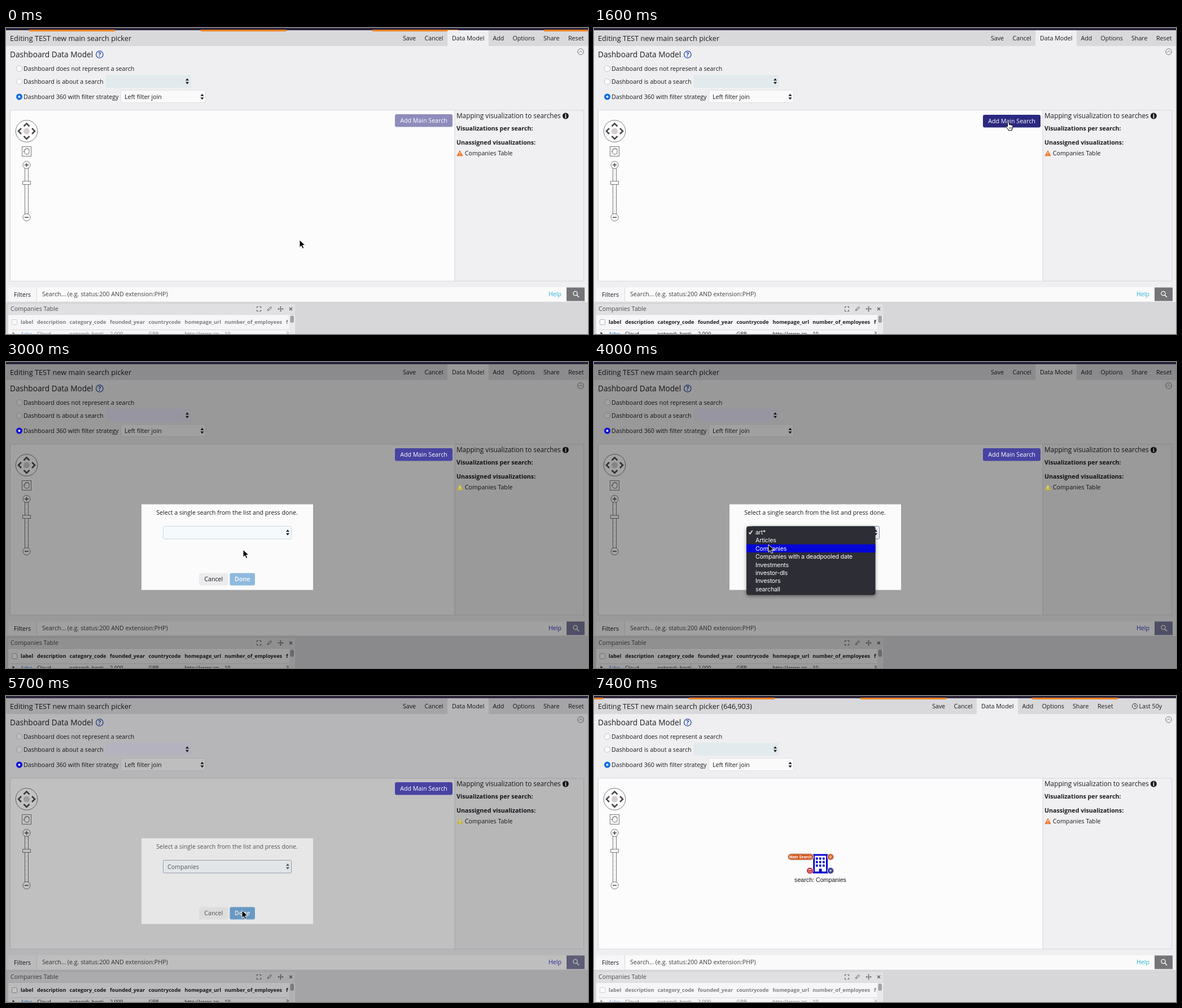
An HTML page that plays this animation: 1031x543 px, repeating every 7.5 s.

```html
<!DOCTYPE html>
<html lang="en">
<head>
<meta charset="utf-8">
<title>Main search picker</title>
<style>
  html, body { margin: 0; width: 100%; height: 100%; overflow: hidden; background: #efeff1; }
  svg { display: block; width: 1031px; height: 543px; }
  text { font: 10.67px "Open Sans", sans-serif; fill: #1c1c20; white-space: pre; }
  .b { font-weight: 700; }
  .title { font-size: 12.76px; }
  .h1 { font-size: 13.64px; }
  .h2 { font-size: 11.77px; }
  .cell { font-size: 9.15px; }
  .arial { font-family: "Liberation Sans", Arial, sans-serif; }
  .badge { font: 700 6.8px "Liberation Sans", Arial, sans-serif; fill: #fff; }
  .opt { font-family: Inter, sans-serif; letter-spacing: -.19px; fill: #fff; }
  .w { fill: #fff; }
  .semi { font-weight: 600; }
  .mid { text-anchor: middle; }
  #listBox { filter: drop-shadow(0 2px 3px rgba(0, 0, 0, .4)); }
</style>
</head>
<body>
<svg id="stage" viewBox="0 0 1031 543" xmlns="http://www.w3.org/2000/svg"></svg>
<script>
const LOOP = 7500, STEP = 100;
const stage = document.getElementById('stage');

const rect = (x, y, w, h, fill, more = '') =>
  `<rect x="${x}" y="${y}" width="${w}" height="${h}" fill="${fill}" ${more}/>`;
const circle = (x, y, r, fill, more = '') =>
  `<circle cx="${x}" cy="${y}" r="${r}" fill="${fill}" ${more}/>`;
const path = (d, fill, more = '') => `<path d="${d}" fill="${fill}" ${more}/>`;
const line = (d, color, width = 1) =>
  path(d, 'none', `stroke="${color}" stroke-width="${width}"`);
const text = (x, y, str, cls = '', more = '') =>
  `<text x="${x}" y="${y}" class="${cls}" ${more}>${str}</text>`;
const group = (id, body) => `<g id="${id}">${body}</g>`;
const arrows = (x, y) =>
  path(`M${x - 3} ${y - 1.2}l3 -4 3 4zM${x - 3} ${y + 1.2}l3 4 3 -4z`, '#1c1c20');
const radio = y => circle(23.5, y, 5.2, '#fafafa', 'stroke="#c4c4c8"');

function header() {
  const items = [['Save', 703], ['Cancel', 741.5], ['Data Model', 790], ['Add', 862.5],
    ['Options', 897.5], ['Share', 952], ['Reset', 996]];
  return rect(0, 0, 1031, 32, '#d9d9dc') + rect(0, 0, 1031, 4, '#2a2338')
    + group('bar', '') + text(7, 23, '', 'title', 'id="title"')
    + group('menu', rect(782, 4, 73, 28, '#efeff1') + items.map(([s, x]) => text(x, 22, s)).join(''))
    + group('range', circle(958, 18, 4.6, 'none', 'stroke="#333"')
      + line('M958 15v3.3h2.5', '#333') + text(965.5, 22, 'Last 50y'));
}

function form() {
  return text(7, 52, 'Dashboard Data Model', 'h1')
    + circle(165.8, 47, 6.2, 'none', 'stroke="#2545a8" stroke-width="1.3"')
    + text(165.8, 51, '?', 'b mid', 'style="fill:#2545a8"')
    + circle(1018, 42, 5.3, 'none', 'stroke="#77777c"') + line('M1015 43.5l3 -3 3 3', '#77777c')
    + radio(72) + text(31, 75.5, 'Dashboard does not represent a search')
    + radio(95) + text(31, 98.5, 'Dashboard is about a search')
    + rect(176.5, 83, 151, 23, '#e2eaed', 'rx="2" id="field"') + arrows(321, 94.5)
    + text(31, 125.5, 'Dashboard 360 with filter strategy')
    + rect(203.5, 110.5, 150, 22, '#fafafa', 'rx="2" stroke="#dfe2e8"')
    + text(210, 125.5, 'Left filter join') + arrows(347.5, 122);
}

function controls() {
  const dots = Array.from({ length: 10 }, (_, i) => rect(36, 252.5 + i * 8, 1, 1, '#999')).join('');
  const edge = 'stroke="#77777c"';
  return circle(36.5, 183, 19.3, '#fff', edge) + circle(36.5, 183, 5.5, '#d6cdd1')
    + line('M31.5 174.5l5 -5 5 5M31.5 192l5 5 5 -5M27 178l-5 5 5 5M46 178l5 5 -5 5', '#48484e', 2.6)
    + rect(28.5, 210.5, 16, 17, '#fdfdfd', edge)
    + path('M33 219.5v-3.5a1 1 0 0 1 2 0v-1.5a1 1 0 0 1 2 0a1 1 0 0 1 2 0v1a1 1 0 0 1 2 0v5q0 3.5 -3 3.5h-2q-1.5 0 -2.5 -1.500l-2.500 -3.500q.5 -1.5 2 .5z',
      '#fff', 'stroke="#55555a" stroke-width=".9"')
    + rect(33.5, 249, 6, 81, '#fff', edge) + dots
    + circle(36.5, 243, 6.5, '#fff', edge) + circle(36.5, 336, 6.5, '#fff', edge)
    + line('M33 243h7M36.5 239.5v7M33 336h7', '#48484e', 1.5)
    + rect(29.5, 272, 14, 5.5, '#fff', edge);
}

function node() {
  let windows = '';
  for (let i = 0; i < 9; i++)
    windows += rect(393 + i % 3 * 6, 286.5 + Math.floor(i / 3) * 6.2, 3.6, 4, '#0808cf');
  const rim = 'stroke="#cfcfd4" stroke-width="1.2"';
  return rect(389.7, 282, 22.8, 31, '#fff', 'stroke="#0808cf" stroke-width="3"') + windows
    + rect(398.6, 306.5, 5, 7, '#0808cf') + rect(387, 312, 28, 2.5, '#0808cf')
    + rect(343.5, 279.8, 45.5, 11.2, '#d2591f', `rx="5.6" ${rim}`)
    + text(366, 287.8, 'Main Search', 'badge mid')
    + circle(419, 285.5, 5.6, '#d2591f', rim) + text(419, 287.8, '0', 'badge mid')
    + circle(382.5, 310, 5.6, '#d0141c', rim)
    + line('M380.3 308.5h4.4l-.4 4h-3.6zM379.8 307.5h5.4', '#fff', .8)
    + circle(419, 310, 5.6, '#3a3a98', rim) + line('M416.8 310h4.4M419 307.8v4.4', '#fff')
    + text(401, 329.5, 'search: Companies', 'arial mid');
}

function panels() {
  return rect(7.5, 146, 1016, 303, '#f0f0f2', 'stroke="#d6d6df"')
    + rect(8, 146.5, 787, 302, '#fcfcfc') + line('M795 146v303', '#d6d6df')
    + controls() + group('node', node())
    + text(798, 160, 'Mapping visualization to searches', 'h2')
    + circle(991.3, 156, 5.5, '#1c1c20') + text(991.3, 159.6, 'i', 'b w mid')
    + text(798, 181.5, 'Visualizations per search:', 'b')
    + text(798, 206.5, 'Unassigned visualizations:', 'b')
    + text(812.8, 225.8, 'Companies Table');
}

function filters() {
  return rect(0, 486, 1031, 57, '#d7d7da')
    + rect(4, 460, 50, 25, '#f6f6f8') + rect(55, 460, 938, 25, '#fafafa')
    + text(14, 476.5, 'Filters') + line('M54.5 460v25', '#dcdce0')
    + text(64, 476, 'Search... (e.g. status:200 AND extension:PHP)', '', 'style="fill:#404046"')
    + text(961, 476, 'Help', '', 'id="help"')
    + rect(993, 460.5, 32, 24, '#757579', 'id="go"')
    + circle(1008.5, 471, 3.6, 'none', 'stroke="#fff" stroke-width="1.3"')
    + line('M1011 473.7l4 4', '#fff', 1.6);
}

function table() {
  const heads = [['label', 26], ['description', 55], ['category_code', 112.5], ['founded_year', 184],
    ['countrycode', 252.5], ['homepage_url', 316.5], ['number_of_employees', 387.3], ['f', 496]];
  const cells = ['Cloud', 'network_hosti', '2,009', 'GBR', 'http://www.ap', '10', '3'];
  return rect(4, 490, 508, 53, '#f6f6f8') + rect(4, 490, 508, 18, '#e0e0e3')
    + text(8, 502, 'Companies Table', '', 'style="fill:#4c4c52"')
    + line('M444.5 497v-2.5h2.5M449 494.5h2.5v2.5M451.5 500v2.5h-2.5M447 502.5h-2.5v-2.5', '#55555a')
    + line('M463.5 501.5l.7 -2.5 4.5 -4.5 1.8 1.8 -4.5 4.5z', '#55555a')
    + line('M486.5 494v9M482 498.5h9M485 495.5l1.5 -1.5 1.5 1.5M485 501.5l1.5 1.5 1.5 -1.5M483.5 497l-1.5 1.5 1.5 1.5M489.5 497l1.5 1.5 -1.5 1.5', '#55555a', .9)
    + line('M502 496l5 5M507 496l-5 5', '#55555a', 1.2)
    + line('M4 508.5h508M8 535.5h493', '#d9d9dd')
    + '<clipPath id="cut"><rect x="4" y="509" width="497" height="34"/></clipPath>'
    + '<g clip-path="url(#cut)">' + group('rows', rect(10.5, 517.5, 9, 9, '#fff', 'rx="1" stroke="#aaa"')
      + heads.map(([s, x]) => text(x, 525.3, s, 'cell b')).join('')
      + path('M11.5 539l4 3 -4 3z', '#444')
      + text(26, 545.5, 'Arbo', 'cell', 'style="fill:#2a78c8"')
      + cells.map((s, i) => text(heads[i + 1][1], 545.5, s, 'cell')).join('')) + '</g>'
    + rect(501.5, 509, 10, 34, '#e9e9ec') + rect(503.5, 510.5, 6.5, 12.5, '#a2a2a6', 'rx="2.5"');
}

const OPTIONS = ['art*', 'Articles', 'Companies', 'Companies with a deadpooled date',
  'Investments', 'investor-dls', 'Investors', 'searchall'];
const ROW = 14.45, TOP = 295;

function dialog() {
  return rect(240, 252.5, 304, 152, '#fbfbfb')
    + text(391.5, 271, 'Select a single search from the list and press done.', 'mid')
    + rect(278.5, 291.5, 227, 22.5, '#f5fafc', 'rx="2" id="pick"')
    + text(286, 306.5, 'Companies', '', 'id="chosen"') + arrows(499, 302.5)
    + rect(342, 374.5, 51.5, 22, '#ececee', 'rx="3"') + text(367.8, 389.3, 'Cancel', 'mid')
    + rect(396.5, 374.5, 44.5, 22, '', 'rx="3" id="doneBox"')
    + text(418.7, 389.3, 'Done', 'w semi mid', 'id="doneText"');
}

function dropdown() {
  return rect(270, 291.5, 228.5, 122, '#2d2d35', 'rx="4" id="listBox"')
    + rect(270, 0, 228.5, ROW, '#0404d6', 'id="hover"')
    + line('M274.5 302.5l2 2.5 4 -6', '#fff', 1.5)
    + OPTIONS.map((s, i) => text(286, 305.7 + i * ROW, s, 'opt')).join('');
}

const arrowShape = path('M0 0v13.5l3.2 -3 2.2 5 2.4 -1 -2.2 -5h4.4z', '#000', 'stroke="#fff"');
const handShape = path('M-1.5 1.2q1.5 -1.5 2.7 0l.3 4.6q1.5 -1 2.2 .2q1.5 -.8 2.2 .4q1.9 -.6 2.1 1.2l-.4 3.9 -1.2 2.5v1.8h-6.2l-.3 -1.7 -4 -4.7q-.3 -1.8 1.5 -1.4l1.3 1.3z', '#fff', 'stroke="#000"')
  + line('M2 10v3M4 10v3M6 10v3', '#000', .7);

stage.innerHTML = rect(0, 0, 1031, 543, '#efeff1') + header() + form() + panels() + filters() + table()
  + rect(0, 4, 1031, 539, '#000', 'id="shade"')
  + circle(23.5, 122, 5.5, '', 'id="dot"') + circle(23.5, 122, 2, '#fff')
  + group('add', rect(689, 153, 102, 22.5, '', 'rx="3" id="addBox"') + text(740, 168, 'Add Main Search', 'w mid'))
  + path('M804 216.8l5.7 10.5h-11.4z', '', 'id="warn"')
  + line('M804 220v4M804 225v1.3', '#f4f4ea', 1.2)
  + group('modal', dialog()) + group('list', dropdown())
  + group('arrow', arrowShape) + group('hand', handShape);

const el = {};
stage.querySelectorAll('[id]').forEach(n => el[n.id] = n);
const set = (id, name, value) => el[id].setAttribute(name, value);
const show = (id, on) => set(id, 'visibility', on ? 'visible' : 'hidden');
const ramp = (t, a, b) => Math.min(1, Math.max(0, (t - a) / (b - a)));

// time, x, y of the pointer tip; equal neighbours are rests
const TRACK = [[0, 520, 376], [700, 520, 376], [900, 587, 292], [1000, 583, 196], [1100, 600, 205],
  [1200, 662, 186], [1400, 734, 166], [1900, 734, 166], [2300, 470, 272], [2600, 420, 333],
  [3000, 420, 333], [3300, 400, 302], [3500, 400, 302], [3800, 309, 324], [4000, 309, 324],
  [4500, 307, 328], [4900, 307, 328], [5400, 418, 380], [5600, 418, 380], [5900, 418, 382],
  [6500, 418, 382], [7000, 430, 560], [LOOP, 430, 560]];

// Smooth curve through the track, standing still at rests
function slope(i, c) {
  const a = TRACK[i - 1], b = TRACK[i], n = TRACK[i + 1];
  if (!a || !n || a[c] === b[c] || b[c] === n[c]) return 0;
  return (n[c] - a[c]) / (n[0] - a[0]);
}

function pointer(t) {
  const i = TRACK.findIndex(k => k[0] > t) - 1;
  const a = TRACK[i], b = TRACK[i + 1], d = b[0] - a[0], p = (t - a[0]) / d, q = 1 - p;
  return [1, 2].map(c => a[c] * q * q * (1 + 2 * p) + b[c] * p * p * (3 - 2 * p)
    + d * p * q * (q * slope(i, c) - p * slope(i + 1, c)));
}

function stripes(t) {
  const period = 304, moved = t * period / 2000;
  const first = t < 3000 ? 41 : 168 + 7400 * period / 2000;
  let out = '';
  for (let x = (first - moved) % period - period; x < 1031; x += period)
    out += rect(x, 3, period / 2, 3, '#f58220');
  return out;
}

function render(t) {
  const [x, y] = pointer(t);
  const busy = t < 1100 || t >= 6300, counted = t >= 7000;
  const shade = Math.min(ramp(t, 1900, 2200), 1 - ramp(t, 5600, 5900));
  const open = shade > 0, over = !open && x > 689 && x < 791 && y > 153 && y < 176;

  el.bar.innerHTML = busy ? stripes(t) : '';
  el.title.textContent = 'Editing TEST new main search picker' + (counted ? ' (646,903)' : '');
  set('menu', 'transform', `translate(${counted ? -104 : 0})`);
  show('range', counted);
  set('rows', 'opacity', t < 1100 ? .55 : 1 - .45 * ramp(t, 7100, 7400));

  set('shade', 'opacity', .36 * shade);
  show('modal', open);
  set('modal', 'opacity', shade);
  set('dot', 'fill', open ? '#0606d8' : '#0b6be0');
  set('field', 'fill', open ? '#ebeafa' : '#e2eaed');
  set('warn', 'fill', open ? '#c4b23c' : '#f0742a');
  el.help.style.fill = open ? '#3434c8' : '#2cb4d2';
  set('go', 'fill', open ? '#7a7a9c' : '#757579');

  show('add', t < 6400);
  set('add', 'transform', `translate(0 ${over && !busy ? 1 : 0})`);
  set('addBox', 'fill', open ? '#4843a2' : busy || t > 5000 ? '#8f8cbc' : over ? '#2b2880' : '#4f49b4');
  show('node', t >= 5800);

  const listed = t >= 3500 && t < 4900, closing = t >= 4800, ready = t >= 4900;
  show('list', listed);
  set('listBox', 'opacity', closing ? .55 : 1);
  set('listBox', 'fill', closing ? '#50504a' : '#2d2d35');
  set('hover', 'y', TOP + ROW * Math.max(0, Math.floor((y - TOP + .5) / ROW)) - .3);
  set('hover', 'fill', closing ? '#68adf0' : '#0404d6');
  set('pick', 'stroke', t < 3300 ? '#c3d8e8' : '#7d86a4');
  show('chosen', open && ready);
  set('doneBox', 'fill', ready ? '#3d86c6' : listed ? '#dcdce6' : '#8fb9de');

  const hand = over && !busy;
  show('hand', hand);
  show('arrow', !hand);
  set(hand ? 'hand' : 'arrow', 'transform', `translate(${x} ${y})`);
}

const begin = performance.now();
function tick(now) {
  const t = Math.max(0, now - begin) % LOOP;
  render(Math.floor(t / STEP) * STEP);
  requestAnimationFrame(tick);
}
render(0);
requestAnimationFrame(tick);
</script>
</body>
</html>
```
